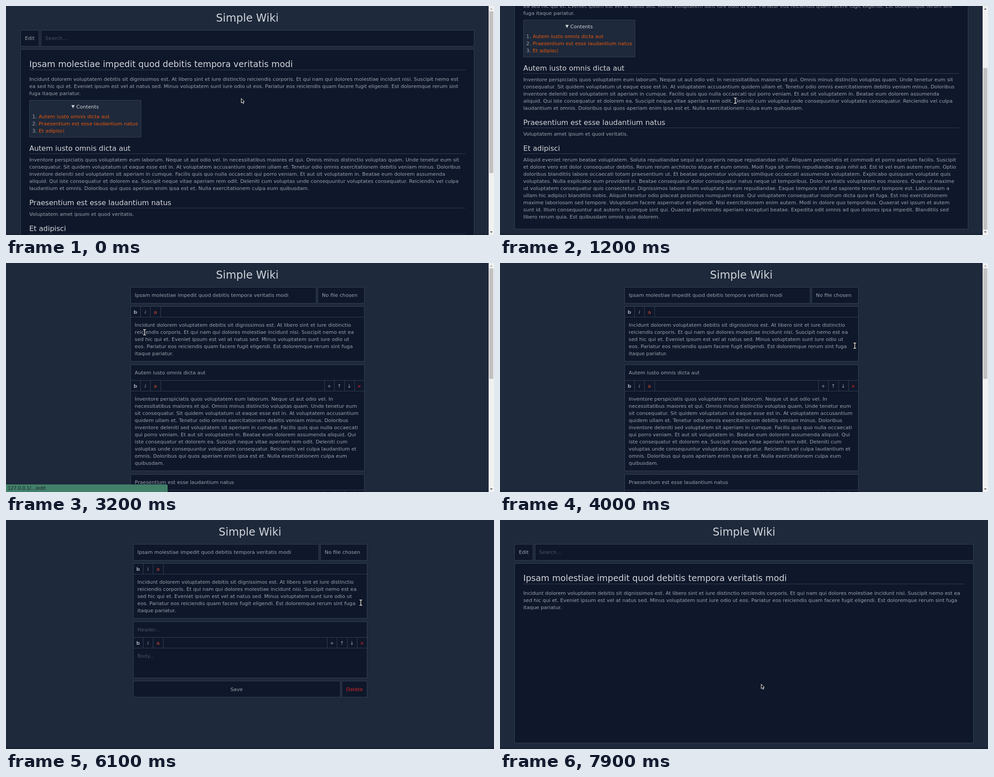
Animation, 1090 px wide and 514 px high, one loop 8000 ms. Source, as an HTML page with a canvas:

```html
<!DOCTYPE html>
<html lang="en">
<head>
<meta charset="utf-8">
<title>Simple Wiki</title>
<style>
html, body { margin: 0; width: 100%; height: 100%; overflow: hidden; background: #1e293b; }
canvas { display: block; }
</style>
</head>
<body>
<canvas id="stage" width="1090" height="514"></canvas>
<script>
const ctx = document.getElementById('stage').getContext('2d');
const WIDTH = 1090, HEIGHT = 514, LOOP = 8000, STEP = 100, LINE = 16;
const BAR = 12;
const C = {
  page: '#1e293b', panel: '#0f172a', border: '#334155', text: '#9ca3af',
  title: '#d1d5db', faint: '#4b5563', link: '#ea580c', red: '#dc2626'
};

const TITLE = 'Ipsam molestiae impedit quod debitis tempora veritatis modi';
const INTRO = 'Incidunt dolorem voluptatem debitis sit dignissimos est. At libero sint et iure distinctio reiciendis corporis. Et qui nam qui dolores molestiae incidunt nisi. Suscipit nemo est ea sed hic qui et. Eveniet ipsum est vel at natus sed. Minus voluptatem sunt iure odio ut eos. Pariatur eos reiciendis quam facere fugit eligendi. Est doloremque rerum sint fuga itaque pariatur.';
const SECTIONS = [
  { head: 'Autem iusto omnis dicta aut',
    body: 'Inventore perspiciatis quos voluptatem eum laborum. Neque ut aut odio vel. In necessitatibus maiores et qui. Omnis minus distinctio voluptas quam. Unde tenetur eum sit consequatur. Sit quidem voluptatum ut eaque esse est in. At voluptatem accusantium quidem ullam et. Tenetur odio omnis exercitationem debitis veniam minus. Doloribus inventore deleniti sed voluptatem sit aperiam in cumque. Facilis quis quo nulla occaecati qui porro veniam. Et aut sit voluptatem in. Beatae eum dolorem assumenda aliquid. Qui iste consequatur et dolorem ea. Suscipit neque vitae aperiam rem odit. Deleniti cum voluptas unde consequuntur voluptates consequatur. Reiciendis vel culpa laudantium et omnis. Doloribus qui quos aperiam enim ipsa est et. Nulla exercitationem culpa eum quibusdam.' },
  { head: 'Praesentium est esse laudantium natus',
    body: 'Voluptatem amet ipsum et quod veritatis.' },
  { head: 'Et adipisci',
    body: 'Aliquid eveniet rerum beatae voluptatem. Soluta repudiandae sequi aut corporis neque repudiandae nihil. Aliquam perspiciatis et commodi et porro aperiam facilis. Suscipit et dolore vero est dolor consequatur debitis. Rerum rerum architecto atque et eum omnis. Modi fuga sit omnis repudiandae quia nihil ad. Est id vel eum autem rerum. Optio doloribus blanditiis labore occaecati totam praesentium ut. Et beatae aspernatur voluptas similique occaecati assumenda voluptatem. Explicabo quisquam voluptate quis voluptates. Nulla explicabo eum provident in. Beatae consequatur dolor consequatur natus neque ut temporibus. Dolor veritatis voluptatem eos maiores. Quam ut maxime ut voluptatem consequatur quis consectetur. Dignissimos labore illum voluptate harum repudiandae. Eaque tempora nihil ad sapiente tenetur tempore est. Laboriosam a ullam hic adipisci blanditiis nobis. Aliquid tenetur odio placeat possimus numquam esse. Qui voluptatem consequatur nostrum dicta quia et fuga. Est nisi exercitationem maxime laboriosam sed tempore. Voluptatum facere aspernatur et eligendi. Nisi exercitationem enim autem. Modi in dolore quo temporibus. Quaerat vel ipsum et autem sunt id. Illum consequuntur aut autem in cumque sint qui. Quaerat perferendis aperiam excepturi beatae. Expedita odit omnis ad quo dolores ipsa impedit. Blanditiis sed libero rerum quia. Est quibusdam omnis quia dolorem.' }
];
const EMPTY = [{ head: 'Header...', body: 'Body...', faint: true }];

// Pointer path: time, x, y; straight lines between stops.
const PATH = [
  [0, 525, 207], [500, 525, 207], [600, 525, 208], [800, 525, 208], [1000, 525, 212],
  [1600, 525, 212], [1800, 522, 212], [2000, 470, 200], [2400, 55, 74], [3100, 55, 74],
  [3200, 309, 155], [4000, 792, 185], [6500, 792, 185], [7100, 583, 368], [LOOP, 583, 368]
];
const SHAPES = [
  [0, 'arrow'], [1200, 'beam'], [1700, 'arrow'], [2400, 'hand'], [3200, 'beam'], [4500, 'hand'],
  [4700, 'arrow'], [4900, 'hand'], [5600, 'arrow'], [5800, 'hand'], [6100, 'beam'],
  [6600, 'arrow'], [7100, 'hand'], [7900, 'arrow']
];

const smooth = (t, from, to) => {
  const u = Math.min(1, Math.max(0, (t - from) / (to - from)));
  return u * u * (3 - 2 * u);
};

function font(size, style = '') {
  ctx.font = `${style} ${size}px "DejaVu Sans", sans-serif`;
}

function text(str, x, y, color = C.text, size = 11.2, align = 'left', style = '') {
  font(size, style);
  ctx.fillStyle = color;
  ctx.textAlign = align;
  ctx.fillText(str, x, y);
}

function rect(x, y, w, h, color) {
  ctx.fillStyle = color;
  ctx.fillRect(x, y, w, h);
}

function box(x, y, right, bottom, fill = C.panel) {
  rect(x, y, right - x, bottom - y, C.border);
  rect(x + 1, y + 1, right - x - 2, bottom - y - 2, fill);
}

function wrap(str, width) {
  font(11.2);
  const lines = [];
  let line = '';
  for (const word of str.split(' ')) {
    const next = line ? line + ' ' + word : word;
    if (line && ctx.measureText(next).width > width) {
      lines.push(line);
      line = word;
    } else line = next;
  }
  return lines.concat(line);
}

function paragraph(lines, x, y, color) {
  lines.forEach((line, i) => text(line, x, y + i * LINE, color));
  return y + lines.length * LINE;
}

function polygon(points, color) {
  ctx.beginPath();
  points.forEach(([x, y]) => ctx.lineTo(x, y));
  ctx.closePath();
  ctx.fillStyle = color;
  ctx.fill();
}

function heading(str, y, size, right) {
  text(str, 52, y, C.title, size);
  rect(52, y + 6, right - 52, 1, C.border);
}

function contents() {
  box(52, 211, 302, 295, C.page);
  polygon([[146, 222.5], [153.5, 222.5], [149.75, 229.5]], C.title);
  text('Contents', 157, 230, C.title);
  SECTIONS.forEach((s, i) => {
    const y = 252 + i * LINE;
    text(i + 1 + '.', 58.6, y);
    text(s.head, 73, y, C.link);
  });
}

function viewPage(width, sections, bottom, hover) {
  const right = width - 52;
  text('Simple Wiki', width / 2, 35, C.title, 24, 'center');
  box(32, 54, 74, 91, hover ? C.page : C.panel);
  text('Edit', 53, 76, C.text, 11.2, 'center');
  box(78, 54, width - 32, 91);
  text('Search...', 87.6, 76, C.faint);
  box(32, 97, width - 32, bottom);
  heading(TITLE, 137, 19.2, right);
  paragraph(wrap(INTRO, right - 53), 52, 168);
  if (!sections.length) return;
  contents();
  let y = 325;
  for (const s of sections) {
    heading(s.head, y, 16, right);
    y = paragraph(wrap(s.body, right - 53), 52, y + 24) + 18;
  }
}

function toolbar(x, y, right, movable, hot) {
  ['b', 'i', 'a'].forEach((ch, i) => {
    const style = ['bold', 'italic', ''][i];
    text(ch, x + 11 + i * 22.4, y + 16, i === 2 ? '#e04a2c' : C.text, 11.2, 'center', style);
    rect(Math.round(x + 22 + i * 22.4), y, 1, 24, C.border);
  });
  if (movable) {
    if (hot) rect(right - 22, y + 1, 21, 22, C.red);
    ['+', '↑', '↓', '×'].forEach((ch, i) => {
      const color = i === 3 && !hot ? C.red : C.text;
      text(ch, right - 79 + i * 22.4, y + 16, color, 11.2, 'center');
      rect(Math.round(right - 90 + i * 22.4), y, 1, 24, C.border);
    });
  }
  rect(x, y + 23, right - x, 1, C.border);
}

function editPage(width, sections, hotDelete, hotSave) {
  const x = Math.round((width - 522.4) / 2), right = x + 523, left = x + 9.6;
  text('Simple Wiki', width / 2, 35, C.title, 24, 'center');
  box(x, 54, right - 108, 91);
  text(TITLE, left, 76);
  box(right - 105, 54, right, 91);
  text('No file chosen', right - 95.2, 76);

  const intro = wrap(INTRO, 502);
  box(x, 97, right, 141 + intro.length * LINE);
  toolbar(x, 98, right, false);
  paragraph(intro, left, 143);

  let y = 228;
  sections.forEach((s, i) => {
    const lines = wrap(s.body, 502);
    const bottom = y + 79 + Math.max(3, lines.length) * LINE;
    const color = s.faint ? C.faint : C.text;
    box(x, y, right, bottom);
    text(s.head, left, y + 22, color);
    rect(x, y + 35, right - x, 1, C.border);
    toolbar(x, y + 36, right, true, hotDelete && i === 0);
    paragraph(lines, left, y + 81, color);
    y = bottom + 7;
  });
  box(x, y - 1, right - 60, y + 36, hotSave ? C.page : C.panel);
  text('Save', x + 231, y + 22, C.text, 11.2, 'center');
  box(right - 57, y - 1, right, y + 36);
  text('Delete', right - 28.5, y + 22, C.red, 11.2, 'center');
}

function scrollbar(scroll, total) {
  const x = WIDTH - BAR, track = HEIGHT - 2 * BAR, mid = x + 6;
  rect(x, 0, BAR, HEIGHT, '#f1f1f1');
  rect(x + 1.5, BAR + scroll * track / total, 9, track * HEIGHT / total, '#c1c1c1');
  polygon([[mid - 3, 8], [mid + 3, 8], [mid, 5]], scroll ? '#505050' : '#a3a3a3');
  polygon([[mid - 3, 506], [mid + 3, 506], [mid, 509]], '#505050');
}

function statusBar(alpha) {
  ctx.globalAlpha = alpha;
  ctx.fillStyle = '#42806a';
  ctx.beginPath();
  ctx.roundRect(0, 497, 361, 18, [0, 3, 0, 0]);
  ctx.fill();
  text('127.0.0.1/.../edit', 4, 509, '#17202c', 10.2);
  ctx.globalAlpha = 1;
}

function outline(path, fill, stroke, width) {
  const p = new Path2D(path);
  ctx.lineJoin = 'round';
  ctx.lineWidth = width;
  ctx.strokeStyle = stroke;
  ctx.fillStyle = fill;
  ctx.fill(p);
  ctx.stroke(p);
}

const CURSORS = {
  arrow() { outline('M0 0V10L2.4 8L4.2 11.6L5.8 10.8L4.1 7.3H7Z', '#0a0a0a', '#fff', 1); },
  beam() {
    const path = 'M-3 -6H-1L0 -5L1 -6H3M0 -5V5M-3 6H-1L0 5L1 6H3';
    outline(path, 'transparent', '#000', 3);
    outline(path, 'transparent', '#fff', 1.4);
  },
  hand() {
    outline('M0 0L2 -.4L5.5 2L9 2.2L12 6L10.5 10L7.5 11.5L4.5 9.5L3 7L5 6.5L3 4Z', '#fff', '#111', 1);
    outline('M5.5 5L8 7.5M7 4L9.5 6.5M5 8L7 9.5', 'transparent', '#111', .8);
  }
};

function pointer(t) {
  const i = PATH.findIndex(p => p[0] > t);
  const [t0, x0, y0] = PATH[i - 1], [t1, x1, y1] = PATH[i];
  const u = (t - t0) / (t1 - t0);
  const shape = SHAPES.filter(s => s[0] <= t).pop()[1];
  ctx.save();
  ctx.translate(Math.round(x0 + (x1 - x0) * u) + .5, Math.round(y0 + (y1 - y0) * u) + .5);
  CURSORS[shape]();
  ctx.restore();
}

function draw(t) {
  const editing = t >= 3200 && t < 7600;
  const removed = (t >= 4700) + (t >= 5600);
  const total = !editing ? 694 : [1015, 769, 635][removed];
  const hasBar = t < 6100;
  const width = hasBar ? WIDTH - BAR : WIDTH;
  let scroll = 0;
  if (t < 3200) scroll = 180 * (smooth(t, 700, 1200) - smooth(t, 1600, 1916));
  else if (t < 6100) scroll = 96 * smooth(t, 4000, 4500);
  scroll = Math.round(scroll);

  rect(0, 0, WIDTH, HEIGHT, C.page);
  ctx.save();
  ctx.translate(0, -scroll);
  if (editing) {
    const list = t < 6100 ? SECTIONS.slice(removed) : EMPTY;
    editPage(width, list, t >= 4500 && t < 6100, t >= 7100);
  } else {
    const full = t < 3200;
    viewPage(width, full ? SECTIONS : [], full ? 681 : 501, t >= 2400 && full);
  }
  ctx.restore();
  rect(0, 510, width, 4, 'rgba(15, 23, 42, .3)');
  if (t >= 3200 && t < 3400) statusBar(t < 3300 ? 1 : .4);
  if (hasBar) scrollbar(scroll, total);
  pointer(t);
}

let shown = -1;
function tick() {
  const t = Math.floor(performance.now() % LOOP / STEP) * STEP;
  if (t !== shown) draw(shown = t);
  requestAnimationFrame(tick);
}
tick();
</script>
</body>
</html>
```
